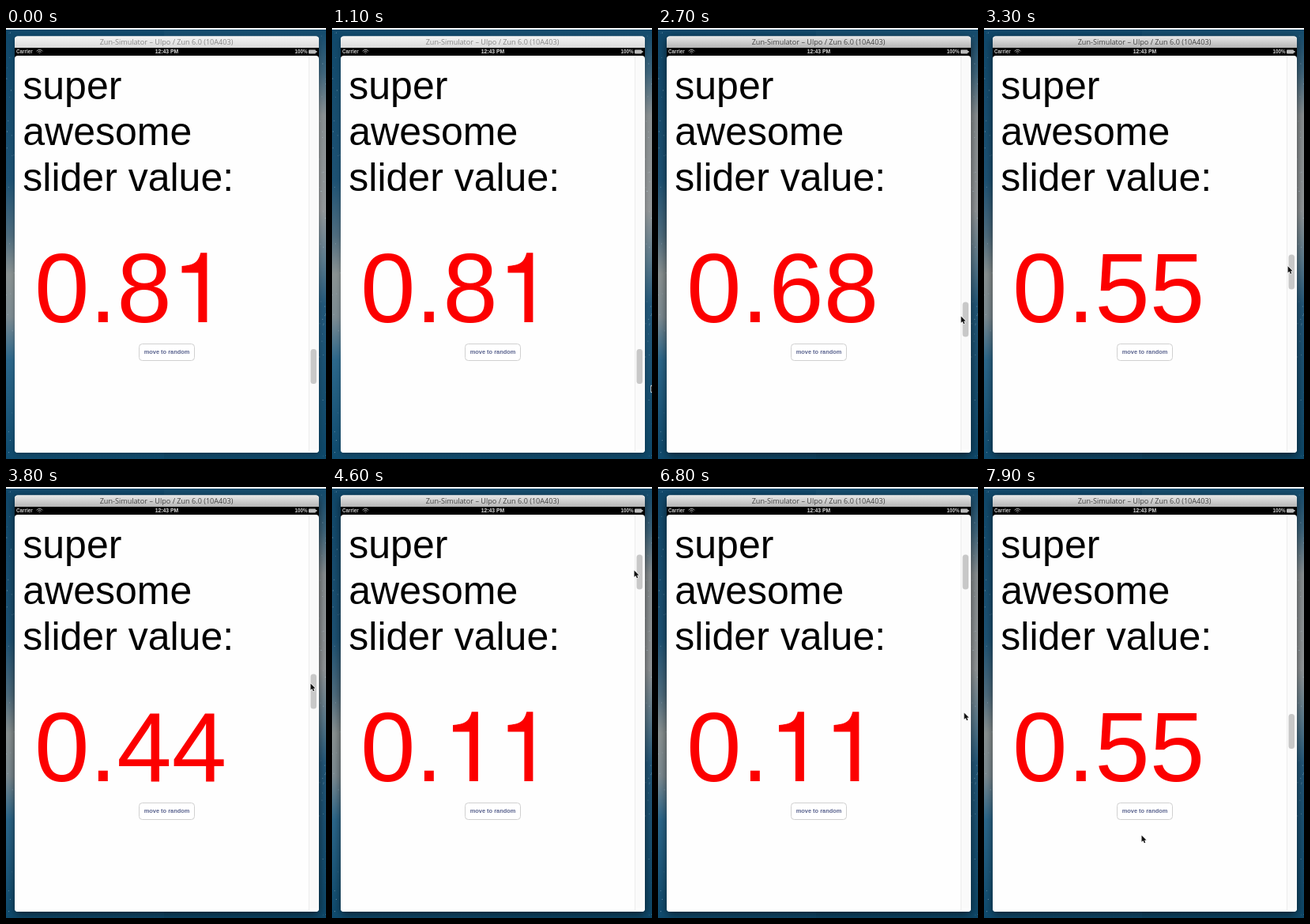
Write an HTML page with a canvas that moves like this. It is 405 by 545 pixels and loops after 8000 ms.

```html
<!DOCTYPE html>
<html lang="en">
<head>
<meta charset="utf-8">
<title>Slider demo</title>
<style>
  html, body { margin: 0; width: 100%; height: 100%; overflow: hidden; background: #fff; }
  canvas { display: block; }
</style>
</head>
<body>
<canvas id="stage" width="405" height="545"></canvas>
<script>
const ctx = document.getElementById('stage').getContext('2d');
const LOOP = 8000, STEP = 100;
const SANS = '"Liberation Sans", Arial, sans-serif';
const WINDOW = { x: 11, y: 10.5, w: 385, h: 526.5 };
const TRACK = { top: 35, travel: 458, thumb: 44 };
const ACTIVE_FROM = 1600, TAP_AT = 7000;

// Keys: [time, value...]; linear while dragging, eased otherwise.
const SLIDER = [[2000, .81], [2700, .68], [3800, .44], [4600, .11], [TAP_AT, .11], [7200, .55]];
const CURSOR = [
  [800, 414, 470], [1500, 390, 426], [2000, 390, 426], [2700, 384, 365],
  [3800, 386, 249], [4600, 383, 106], [5500, 383, 106], [6500, 388, 286],
  [7100, 388, 286], [7900, 200, 441]
];

const smooth = u => u * u * (3 - 2 * u);

function sample(keys, t) {
  if (t <= keys[0][0]) return keys[0].slice(1);
  const i = keys.findIndex(k => k[0] > t);
  if (i < 0) return keys.at(-1).slice(1);
  const a = keys[i - 1], b = keys[i];
  const dragging = t >= 2000 && t < 4600;
  let u = (t - a[0]) / (b[0] - a[0]);
  if (!dragging) u = smooth(u);
  return a.slice(1).map((v, n) => v + (b[n + 1] - v) * u);
}

function text(str, x, y, font, color, align = 'left') {
  ctx.font = font;
  ctx.fillStyle = color;
  ctx.textAlign = align;
  ctx.fillText(str, x, y);
}

function box(x, y, w, h, radius, fill, stroke) {
  ctx.beginPath();
  ctx.roundRect(x, y, w, h, radius);
  if (fill) { ctx.fillStyle = fill; ctx.fill(); }
  if (stroke) { ctx.strokeStyle = stroke; ctx.lineWidth = 1; ctx.stroke(); }
}

function vertical(y0, y1, ...stops) {
  const g = ctx.createLinearGradient(0, y0, 0, y1);
  stops.forEach(([at, color]) => g.addColorStop(at, color));
  return g;
}

function drawDesktop() {
  ctx.fillStyle = '#fff';
  ctx.fillRect(0, 0, 405, 545);
  ctx.fillStyle = vertical(2, 545, [0, '#10486a'], [.35, '#1d5274'], [.48, '#4f6d7f'],
    [.57, '#8b9393'], [.67, '#7d8c93'], [.77, '#2c688c'], [1, '#0e4a6d']);
  ctx.fillRect(0, 2, 200, 543);
  ctx.fillStyle = vertical(2, 545, [0, '#124a6c'], [.1, '#3f667d'], [.2, '#8a9092'],
    [.42, '#94989a'], [.54, '#5a7a8c'], [.64, '#23587a'], [1, '#0d4768']);
  ctx.fillRect(200, 2, 205, 543);
  let seed = 7;
  const random = () => (seed = seed * 16807 % 2147483647) / 2147483647;
  for (let i = 0; i < 70; i++) {
    const side = random() < .5 ? 0 : 396;
    const x = side + random() * 10, y = 4 + random() * 540;
    ctx.fillStyle = `rgba(200,225,240,${.15 + random() * .4})`;
    ctx.fillRect(x, y, 1, 1);
  }
}

function drawStatusBar() {
  ctx.fillStyle = '#000';
  ctx.fillRect(11, 25, 385, 14);
  const font = `bold 6.3px ${SANS}`;
  text('Carrier', 13, 32.3, font, '#ccc');
  text('12:43 PM', 203.5, 32.3, `bold 6.8px ${SANS}`, '#ddd', 'center');
  text('100%', 381.5, 32.3, font, '#ccc', 'right');
  ctx.strokeStyle = '#aaa';
  ctx.lineWidth = 1;
  for (const r of [1, 3, 5]) {
    ctx.beginPath();
    ctx.arc(42.5, 32.5, r, -Math.PI * .78, -Math.PI * .22);
    ctx.stroke();
  }
  box(383, 27.5, 9, 5, 1, '#bbb');
  ctx.fillRect(392, 29, 1.5, 2);
}

function drawWindow(active) {
  const { x, y, w, h } = WINDOW;
  ctx.save();
  ctx.shadowColor = `rgba(0,0,0,${active ? .6 : .3})`;
  ctx.shadowBlur = active ? 11 : 6;
  ctx.shadowOffsetY = active ? 3 : 2;
  box(x, y, w, h, 4, '#fff');
  ctx.restore();
  const bar = active ? [[0, '#e8e8e8'], [1, '#b5b5b5']] : [[0, '#f4f4f4'], [1, '#dadada']];
  box(x, y, w, 15, [4, 4, 0, 0], vertical(y, 25, ...bar));
  text('Zun-Simulator – Ulpo / Zun 6.0 (10A403)', 203, 20.7,
    '9.1px "Open Sans", "Noto Sans", sans-serif', active ? '#444' : '#888', 'center');
  drawStatusBar();
  box(x, 35, w, 502, 4, '#fefefe');
}

// A numeral one without a foot, drawn on the em square.
function drawOne(x, y, size) {
  ctx.save();
  ctx.translate(x, y);
  ctx.scale(size, -size);
  ctx.beginPath();
  ctx.moveTo(.102, .5);
  ctx.lineTo(.102, .568);
  ctx.bezierCurveTo(.215, .582, .263, .592, .292, .703);
  ctx.lineTo(.357, .703);
  ctx.lineTo(.357, 0);
  ctx.lineTo(.269, 0);
  ctx.lineTo(.269, .5);
  ctx.fill();
  ctx.restore();
}

function drawValue(value) {
  const size = 125, baseline = 372;
  let x = 36;
  for (const char of value.toFixed(2)) {
    ctx.font = `${size}px ${SANS}`;
    ctx.fillStyle = '#fc0000';
    if (char === '1') drawOne(x, baseline, size);
    else text(char, x, baseline, ctx.font, '#fc0000');
    x += ctx.measureText(char).width;
  }
}

function drawSlider(value) {
  ctx.fillStyle = '#fafafa';
  ctx.fillRect(384, 38, 11, 495);
  ctx.fillStyle = '#ececec';
  ctx.fillRect(383, 36, 1, 500);
  box(385.5, TRACK.top + TRACK.travel * value, 7.5, TRACK.thumb, 3.5, '#c8c8c8');
}

function drawCursor(x, y) {
  ctx.save();
  ctx.translate(x - .5, y - .5);
  ctx.scale(.88, .88);
  ctx.beginPath();
  [[0, 0], [0, 9.5], [2.2, 7.5], [3.8, 11], [5.4, 10.3], [3.9, 7], [6.8, 6.8]]
    .forEach(p => ctx.lineTo(...p));
  ctx.closePath();
  ctx.lineJoin = 'round';
  ctx.lineWidth = 1.5;
  ctx.strokeStyle = '#fff';
  ctx.stroke();
  ctx.fillStyle = '#111';
  ctx.fill();
  ctx.restore();
}

function draw(t) {
  drawDesktop();
  drawWindow(t >= ACTIVE_FROM);
  ['super', 'awesome', 'slider value:'].forEach((line, i) =>
    text(line, 21.3, 89.7 + i * 58, `50px ${SANS}`, '#000'));
  const [position] = sample(SLIDER, t);
  drawValue(t >= TAP_AT ? .55 : position);
  box(168.5, 399.5, 70, 21, 4, '#fff', '#d0d0d0');
  text('move to random', 203.5, 412.3, `bold 7.4px ${SANS}`, '#5b648f', 'center');
  drawSlider(position);
  if (t >= 800) drawCursor(...sample(CURSOR, t));
}

function tick() {
  const t = performance.now() % LOOP;
  draw(Math.floor(t / STEP) * STEP);
  requestAnimationFrame(tick);
}
tick();
</script>
</body>
</html>
```
